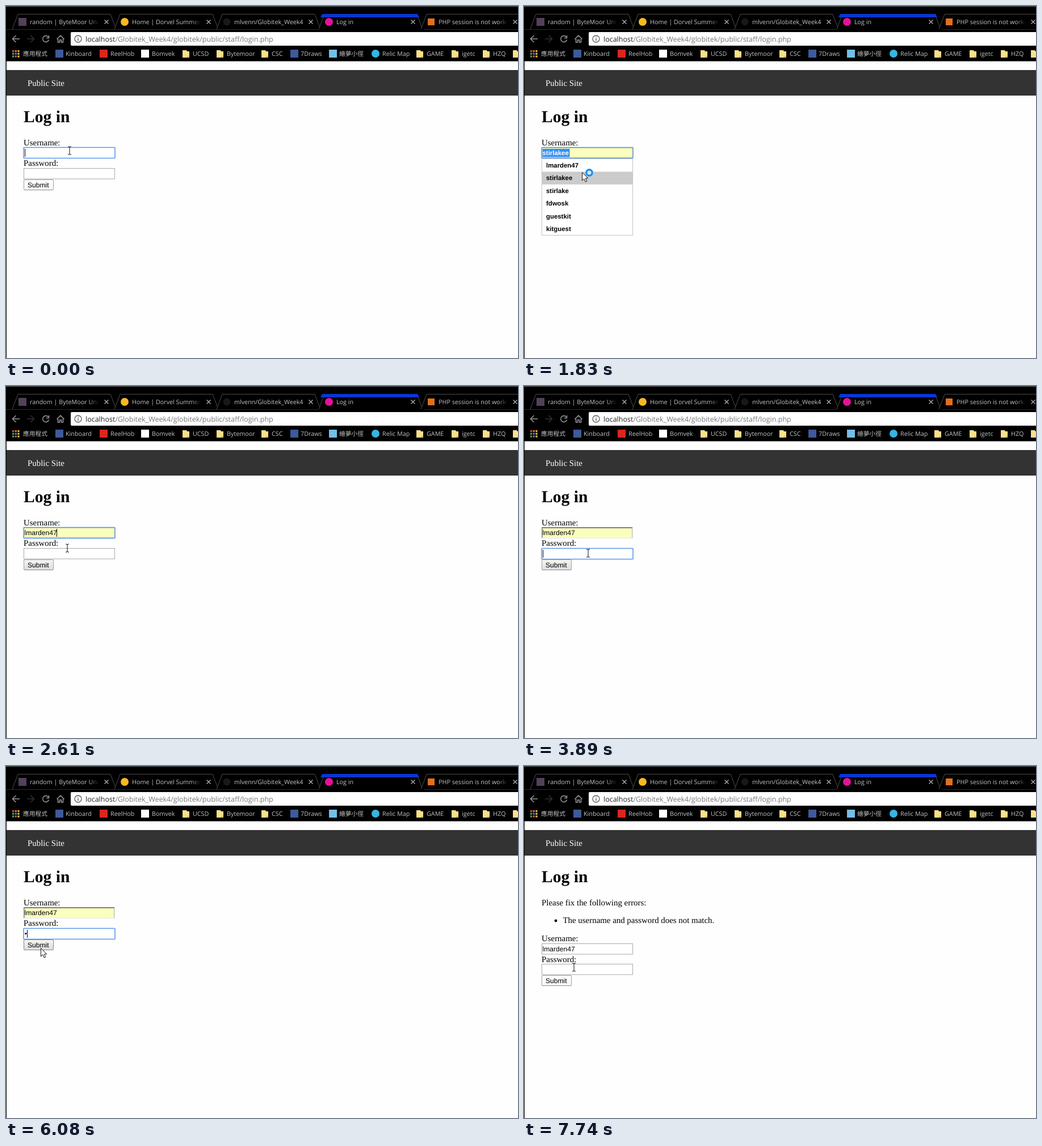
Recreate the animation shown at these times as an HTML page. Size 902 by 621 pixels, loop 8 s.

```html
<!DOCTYPE html>
<html lang="en">
<head>
<meta charset="utf-8">
<title>Log in</title>
<style>
html, body { margin: 0; width: 100%; height: 100%; overflow: hidden; background: #fff; }
svg { display: block; text-rendering: geometricPrecision; }
.ui { font-family: "Open Sans", "Noto Sans", "Noto Sans CJK TC", "Noto Sans CJK", sans-serif; font-size: 10.75px; fill: #c4c4c4; }
.serif { font-family: "Liberation Serif", serif; font-size: 14.9px; }
.sans { font-family: "Liberation Sans", sans-serif; font-size: 12.1px; }
.list { font-family: "Liberation Sans", sans-serif; font-size: 11.4px; font-weight: bold; }
</style>
</head>
<body>
<svg width="902" height="621" viewBox="0 0 902 621">
  <defs>
    <linearGradient id="fade" gradientUnits="userSpaceOnUse" x1="104" x2="122" y1="0" y2="0">
      <stop stop-color="#c4c4c4"/><stop offset="1" stop-color="#c4c4c4" stop-opacity="0"/>
    </linearGradient>
    <linearGradient id="light" x2="0" y2="1"><stop stop-color="#fff"/><stop offset="1" stop-color="#f6f6f6"/></linearGradient>
    <linearGradient id="grey" x2="0" y2="1"><stop stop-color="#f6f6f6"/><stop offset="1" stop-color="#dcdcdc"/></linearGradient>
    <g id="folder"><path d="M0 0H7L8 2H12V13H0Z" fill="#fbe08a"/><path d="M8 10H12V13H8Z" fill="#e9c25c"/></g>
    <path id="arrow" d="M.5 .5V15L3.9 11.8L6.3 17.2L8.7 16.1L6.4 10.9H10.8Z" fill="#fff" stroke="#111"/>
    <g id="busy"><use href="#arrow"/><circle cx="13" cy="1" r="5.2" fill="#cfe8fb" stroke="#2490ea" stroke-width="3.4"/></g>
    <path id="beam" d="M-3 -7H-1L0 -6L1 -7H3M0 -6V6M-3 7H-1L0 6L1 7H3" fill="none" stroke="#111"/>
  </defs>
  <rect width="902" height="621" fill="#fefefe"/>
  <rect width="902" height="97.500" fill="#000"/>
  <rect width="902" height="1.5" fill="#474b4e"/>
  <rect y="97" width="1" height="524" fill="#000"/>
  <g id="tabs" class="ui"></g>
  <g fill="none" stroke="#999" stroke-width="1.5">
    <path d="M24 58H12M17.500 52L11.500 58L17.500 64"/>
    <path d="M37 58H49M43.500 52L49.500 58L43.500 64" stroke="#303030"/>
    <path d="M74.500 54.500A5.500 5.500 0 1 0 75.500 59.500M75.500 52V56.500H71"/>
    <path d="M89.500 58.500L96 52L102.500 58.500M91.500 58V64H94.500V60H97.500V64H100.500V58"/>
  </g>
  <rect x="114" y="46" width="800" height="24" rx="2" fill="#fff"/>
  <circle cx="127" cy="58" r="6" fill="none" stroke="#5c5c5c" stroke-width="1.3"/>
  <path d="M127 57V61.500M127 54.300V55.800" stroke="#5c5c5c" stroke-width="1.4"/>
  <text x="140" y="62.500" class="ui" style="font-size:12.5px;fill:#777"><tspan fill="#222">localhost</tspan>/Globitek_Week4/globitek/public/staff/login.php</text>
  <g id="bookmarks" class="ui"></g>
  <rect x="1" y="113" width="901" height="45" fill="#333"/>
  <rect x="1" y="157" width="901" height="1" fill="#2d2a2d"/>
  <g class="serif">
    <text x="38" y="141" fill="#fff">Public Site</text>
    <text x="31" y="204.500" font-weight="bold" style="font-size:29.6px">Log in</text>
  </g>
  <g id="form"></g>
</svg>
<script>
const $ = id => document.getElementById(id);
const text = (x, y, s, cls = 'serif', extra = '') => `<text x="${x}" y="${y}" class="${cls}" ${extra}>${s}</text>`;
const rect = (x, y, w, h, fill, extra = '') => `<rect x="${x}" y="${y}" width="${w}" height="${h}" fill="${fill}" ${extra}/>`;
const disc = (x, y, r, fill, extra = '') => `<circle cx="${x}" cy="${y}" r="${r}" fill="${fill}" ${extra}/>`;

// Browser chrome
const ACTIVE_TAB = 3;
const tabs = [
  ['random | ByteMoor University', rect(-20, -7, 14, 14, '#54405a')],
  ['Home | Dorvel Summer of', disc(-13, 0, 7, '#f5b921')],
  ['mlvenn/Globitek_Week4', disc(-13, 0, 6.5, '#15191c')],
  ['Log in', '<g id="favicon"></g>'],
  ['PHP session is not working', rect(-19, -6, 12, 12, '#e0701f')]
];
$('tabs').innerHTML = tabs.map(([title, icon], i) => {
  const fill = i === 2 || i === ACTIVE_TAB ? '#c4c4c4' : 'url(#fade)';
  const strip = i === ACTIVE_TAB ? '<path d="M-28 -8L-25 -14H143L146 -8Z" fill="#0a36d2"/>' : '';
  return `<g transform="translate(${42 + 180 * i} 28)">
    <path d="M-31 13L-21 -13.500H142L152 13" fill="#000" stroke="#4c4c4c"/>${strip}${icon}
    <text y="4" style="fill:${fill}">${title}</text>
    <path d="M131.500 -3.500L138.500 3.500M138.500 -3.500L131.500 3.500" stroke="#b0b0b0" stroke-width="1.4"/></g>`;
}).join('') + '<path d="M0 41.500H550M736 41.500H902" stroke="#2c2c2c"/>';

const folder = x => `<use href="#folder" x="${x}" y="78"/>`;
const square = (x, fill) => rect(x, 77, 14, 14, fill);
const gridColours = ['#e2483d', '#e8713a', '#f1b32f', '#4aa557', '#3f86d9', '#e8b93a', '#47a15b', '#d9534a', '#eec23c'];
const bookmarks = [
  [30, '應用程式', gridColours.map((c, i) => rect(11 + i % 3 * 4.7, 78 + Math.floor(i / 3) * 4.7, 3.2, 3.2, c)).join('')],
  [105, 'Kinboard', square(87, '#3d5a9b')],
  [184, 'ReelHob', square(165, '#dc2620')],
  [257, 'Bomvek', square(238, '#fff')],
  [329, 'UCSD'], [389, 'Bytemoor'], [468, 'CSC'],
  [519, '7Draws', square(501, '#3d5a9b')],
  [587, '繪夢小徑', square(569, '#72bfe6')],
  [663, 'Relic Map', disc(651, 84, 7, '#35b5e2')],
  [741, 'GAME'], [803, 'igetc'], [858, 'HZQ'], [911, '']
];
$('bookmarks').innerHTML = bookmarks.map(([x, name, icon]) => (icon || folder(x - 18)) + text(x, 88, name, '')).join('');

// Timeline
const LOOP = 8000;
const USER = 'lmarden47';
const names = [USER, 'stirlakee', 'stirlake', 'fdwosk', 'guestkit', 'kitguest'];
const cursorSteps = [
  [0, 'beam', 112, 255], [1310, 'busy', 107, 270], [1450, 'busy', 105, 282], [1580, 'busy', 103, 294],
  [1830, 'busy', 102, 293], [1970, 'busy', 102, 288], [2090, 'arrow', 104, 285], [2210, 'arrow', 107, 281],
  [2610, 'beam', 108, 286], [2980, 'arrow', 100, 303], [3100, 'arrow', 99, 307], [3350, 'arrow', 99, 306],
  [3480, 'beam', 107, 302], [3640, 'beam', 113, 295], [5570, 'beam', 104, 297], [5690, 'beam', 90, 300],
  [5810, 'beam', 76, 303], [5960, 'arrow', 66, 315], [6080, 'arrow', 61, 321], [6970, 'arrow', 74, 306],
  [7100, 'arrow', 87, 297], [7220, 'beam', 95, 320], [7350, 'beam', 89, 349], [7500, 'beam', 88, 351],
  [7620, 'beam', 88, 353], [7740, 'beam', 88, 355]
];
const caretToggles = [0, 140, 790, 1310, 2610, 3100, 3640, 4540, 4940, 5450, 5960, 6460];
const hoverSteps = [[0, -1], [1450, 0], [1580, 1], [1970, 0]];
const latest = (steps, t) => steps.filter(s => s[0] <= t).pop();

function field(y, { focus, auto }) {
  const fill = auto ? '#faffbd' : '#fff';
  if (focus) {
    return rect(31, y + .5, 161, 19, fill, 'rx="1" stroke="#5c97ea" stroke-width="1.6"') +
      (auto ? rect(32, y + 1.5, 159, 17, 'none', 'stroke="#a9b9c4" stroke-width=".8"') : '');
  }
  if (!auto) return rect(31.5, y + .5, 160, 18.5, fill, 'stroke="#a9a9a9"');
  return rect(31, y, 161, 20, '#e9e9e9') + rect(31, y, 160, 19, '#808080') + rect(32.5, y + 2, 158, 17, fill);
}

function button(y, grey, hover) {
  return rect(31.5, y + .5, 52, 18, `url(#${grey ? 'grey' : 'light'})`, `rx="1.5" stroke="${hover ? '#8a8a8a' : '#a0a0a0'}"`) +
    rect(32, y + 18, 51, 1, '#8c8c8c') + text(38, y + 13.5, 'Submit', 'sans');
}

function dropdown(hover) {
  const rowHeight = 22.4;
  return rect(31.5, 269.5, 160, 135, '#fff', 'stroke="#c4c4c4"') +
    (hover < 0 ? '' : rect(32, 270 + hover * rowHeight, 159, rowHeight, '#cbcbcb')) +
    names.map((name, i) => text(39, 285 + i * rowHeight, name, 'list')).join('');
}

function loginForm(t) {
  const open = t >= 290 && t < 2610;
  const chosen = t >= 2610;
  const inPassword = t >= 3890;
  const typed = t >= 4940;
  const hover = open ? latest(hoverSteps, t)[1] : -1;
  let out = text(31, 245.5, 'Username:') + field(249, { focus: !inPassword, auto: chosen || hover >= 0 }) +
    text(31, 282, 'Password:') + field(286, { focus: inPassword }) + button(306, chosen, t >= 5960);
  if (chosen) out += text(32.5, 263, USER, 'sans');
  if (hover >= 0) {
    out += rect(32.5, 252, hover ? 48 : 57.5, 14.5, '#3390f8') + text(32.5, 263.3, names[hover], 'list', 'fill="#fff"');
  }
  if (typed) out += disc(34.8, 295.7, 1.6, '#111');
  if (caretToggles.filter(c => c <= t).length % 2) {
    out += rect(inPassword ? (typed ? 37 : 33) : chosen ? 89 : 33, inPassword ? 289 : 252, 1, 14, '#000');
  }
  return out + (open ? dropdown(hover) : '');
}

const errorForm = () =>
  text(31, 245.5, 'Please fix the following errors:') + disc(56, 273, 2.4, '#000') +
  text(68.5, 277, 'The username and password does not match.') +
  text(31, 309, 'Username:') + field(313, {}) + text(32.5, 326.7, USER, 'sans') +
  text(31, 345.5, 'Password:') + field(349, {}) + button(369, false);

function render(now) {
  const t = now % LOOP;
  const [, shape, x, y] = latest(cursorSteps, t);
  const loading = t >= 6460 && t < 6710;
  $('favicon').innerHTML = loading
    ? '<path d="M-13 -6A6 6 0 1 1 -19 0" fill="none" stroke="#9a9a9a" stroke-width="1.8"/>'
    : disc(-13, 0, 7, '#e5119a');
  $('form').innerHTML = (t < 6590 ? loginForm(t) : errorForm()) + `<use href="#${shape}" x="${x}" y="${y}"/>`;
}

const start = performance.now();
function tick() {
  render(performance.now() - start);
  requestAnimationFrame(tick);
}
tick();
</script>
</body>
</html>
```
